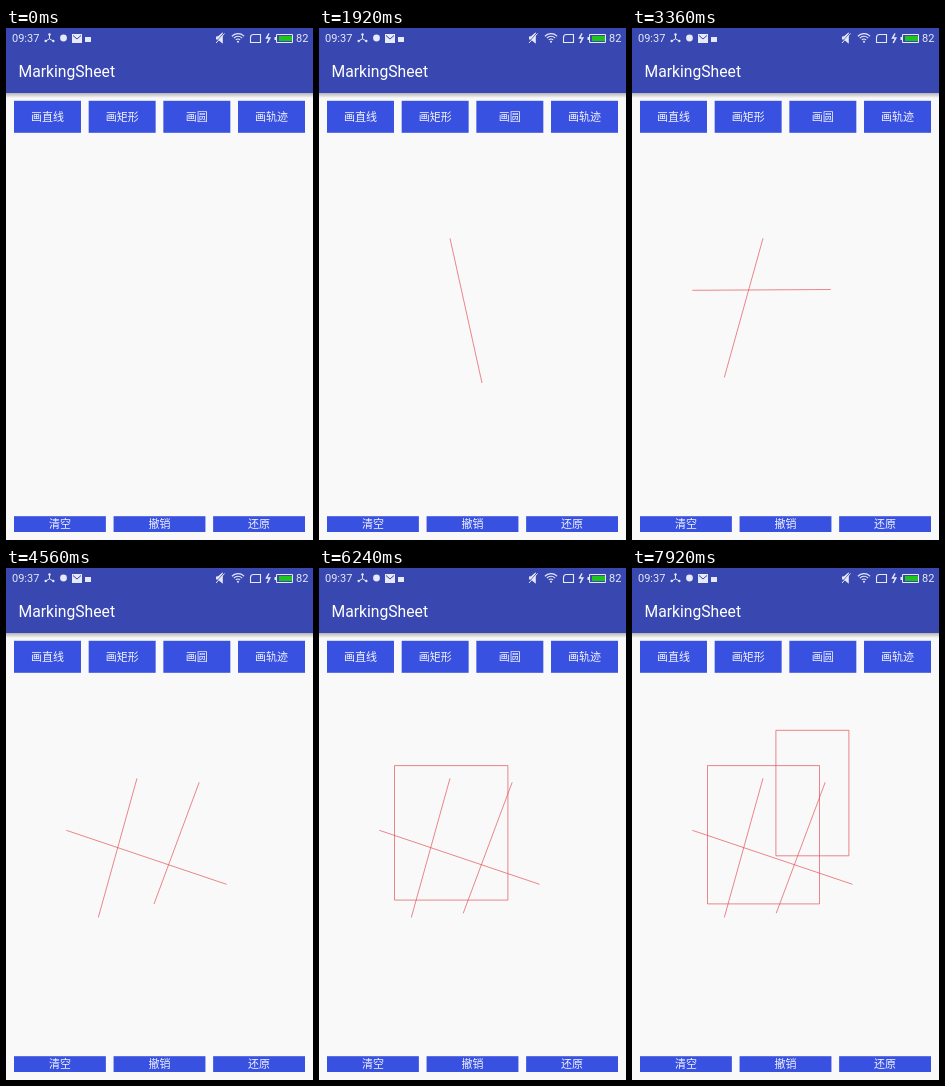
Animation, 307 px wide and 512 px high, one loop 8 s. Source, as an HTML page with a canvas:

```html
<!DOCTYPE html>
<html lang="zh">
<head>
<meta charset="utf-8">
<style>
html, body { margin: 0; width: 100%; height: 100%; overflow: hidden; background: #f9f9f9; }
canvas { display: block; }
</style>
</head>
<body>
<canvas id="stage" width="307" height="512"></canvas>
<script>
const ctx = document.getElementById('stage').getContext('2d');
const LOOP = 8000, STEP = 240, WIDTH = 307;
const PAPER = '#f9f9f9', BAR = '#3948b0', BUTTON = '#3951e0', ICON = '#e6e9f8', INK = '#e0484e';
const CJK = '"Noto Sans CJK SC", "Noto Sans CJK", sans-serif';

// A finger drags from one point through a second to a third, at the given steps.
const drags = [
  { kind: 'line', at: [5, 8, 11], from: [131, 210.3], via: [163, 355], to: [92.3, 349.5] },
  { kind: 'line', at: [11, 14, 16], from: [60.3, 262.3], via: [198.8, 261.5], to: [220.5, 316.3] },
  { kind: 'line', at: [16, 19, 20], from: [193.2, 214.3], via: [148, 336], to: [144.2, 345.3] },
  { kind: 'rect', at: [21, 26, 27], from: [75.5, 197.6], via: [188.9, 332.1], to: [187.5, 335.9] },
  { kind: 'rect', at: [27, 30, 33], from: [143.9, 162.3], via: [220.1, 232.5], to: [216.9, 287.8] }
];

const clamp = v => Math.min(1, Math.max(0, v));
const mix = (a, b, k) => a.map((v, i) => v + (b[i] - v) * k);

function fill(color, x, y, w, h) {
  ctx.fillStyle = color;
  ctx.fillRect(x, y, w, h);
}

function text(str, x, y, size, color, align = 'left', family = 'Roboto, sans-serif') {
  ctx.font = size + 'px ' + family;
  ctx.textAlign = align;
  ctx.fillStyle = color;
  ctx.fillText(str, x, y);
}

function stroke(color, width, trace) {
  ctx.beginPath();
  trace();
  ctx.strokeStyle = color;
  ctx.lineWidth = width;
  ctx.stroke();
}

function line(color, width, ...points) {
  stroke(color, width, () => points.forEach(p => ctx.lineTo(...p)));
}

function dot(x, y, r) {
  ctx.beginPath();
  ctx.arc(x, y, r, 0, Math.PI * 2);
  ctx.fillStyle = ICON;
  ctx.fill();
}

function buttonRow(labels, y, h) {
  const margin = 8, gap = 7.7;
  const w = (WIDTH - 2 * margin + gap) / labels.length - gap;
  labels.forEach((label, i) => {
    const x = margin + i * (w + gap);
    fill(BUTTON, x, y, w, h);
    text(label, x + w / 2, y + h / 2 + 4.2, 11, '#f2f4ff', 'center', CJK);
  });
}

function leftIcons() {
  for (let i = 0; i < 3; i++) {
    const a = (i * 4 - 3) * Math.PI / 6;
    const end = [43.5 + 4.4 * Math.cos(a), 10.8 + 4.4 * Math.sin(a)];
    line(ICON, 1, [43.5, 10.8], end);
    dot(...end, 1.2);
  }
  dot(57.5, 10, 3.4);
  fill(ICON, 66, 6, 10, 9);
  line(BAR, 1, [67, 7.5], [71, 11], [75, 7.5]);
  fill(ICON, 79, 9, 6, 5);
}

function rightIcons() {
  line(ICON, 3, [210, 10], [213, 10]);
  line(ICON, 2.6, [212, 10], [215.5, 7], [215.5, 13], [212, 10]);
  line(BAR, 1, [210, 14], [218, 5]);
  line(ICON, 1, [210, 15], [218.5, 5.5]);
  for (const r of [3, 5.7, 8.4]) {
    stroke(ICON, 1.1, () => ctx.arc(232, 14, r, -Math.PI * 0.76, -Math.PI * 0.24));
  }
  dot(232, 13.7, 1);
  stroke(ICON, 1.1, () => ctx.roundRect(244.5, 6.5, 10, 8, [3, 0, 0, 0]));
  line(ICON, 1.5, [263, 5.5], [260.5, 10], [263.8, 10], [261.2, 15]);
  stroke(ICON, 1, () => ctx.rect(270.5, 6.5, 16, 8));
  fill(ICON, 268.5, 9, 1.5, 3);
  fill('#20c51c', 273, 8, 13, 5);
}

function chrome() {
  fill(PAPER, 0, 0, WIDTH, 512);
  const shadow = ctx.createLinearGradient(0, 65, 0, 70);
  shadow.addColorStop(0, 'rgba(0,0,0,.28)');
  shadow.addColorStop(1, 'rgba(0,0,0,0)');
  fill(shadow, 0, 65, WIDTH, 5);
  fill(BAR, 0, 0, WIDTH, 65);
  text('09:37', 6, 14, 11, ICON);
  text('82', 290, 14, 11, ICON);
  leftIcons();
  rightIcons();
  text('MarkingSheet', 12.5, 49, 15.7, '#fff');
  buttonRow(['画直线', '画矩形', '画圆', '画轨迹'], 72.8, 32);
  buttonRow(['清空', '撤销', '还原'], 488.2, 15.8);
}

function drawDrag({ kind, at: [start, mid, end], from, via, to }, step) {
  if (step <= start) return;
  const out = mix(from, via, clamp((step - start) / (mid - start)));
  const tip = mix(out, to, clamp((step - mid) / (end - mid)));
  if (kind === 'line') line(INK, 0.65, from, tip);
  else stroke(INK, 0.65, () => ctx.rect(...from, tip[0] - from[0], tip[1] - from[1]));
}

function render() {
  const step = Math.floor(performance.now() % LOOP / STEP);
  chrome();
  drags.forEach(d => drawDrag(d, step));
  requestAnimationFrame(render);
}
render();
</script>
</body>
</html>
```
